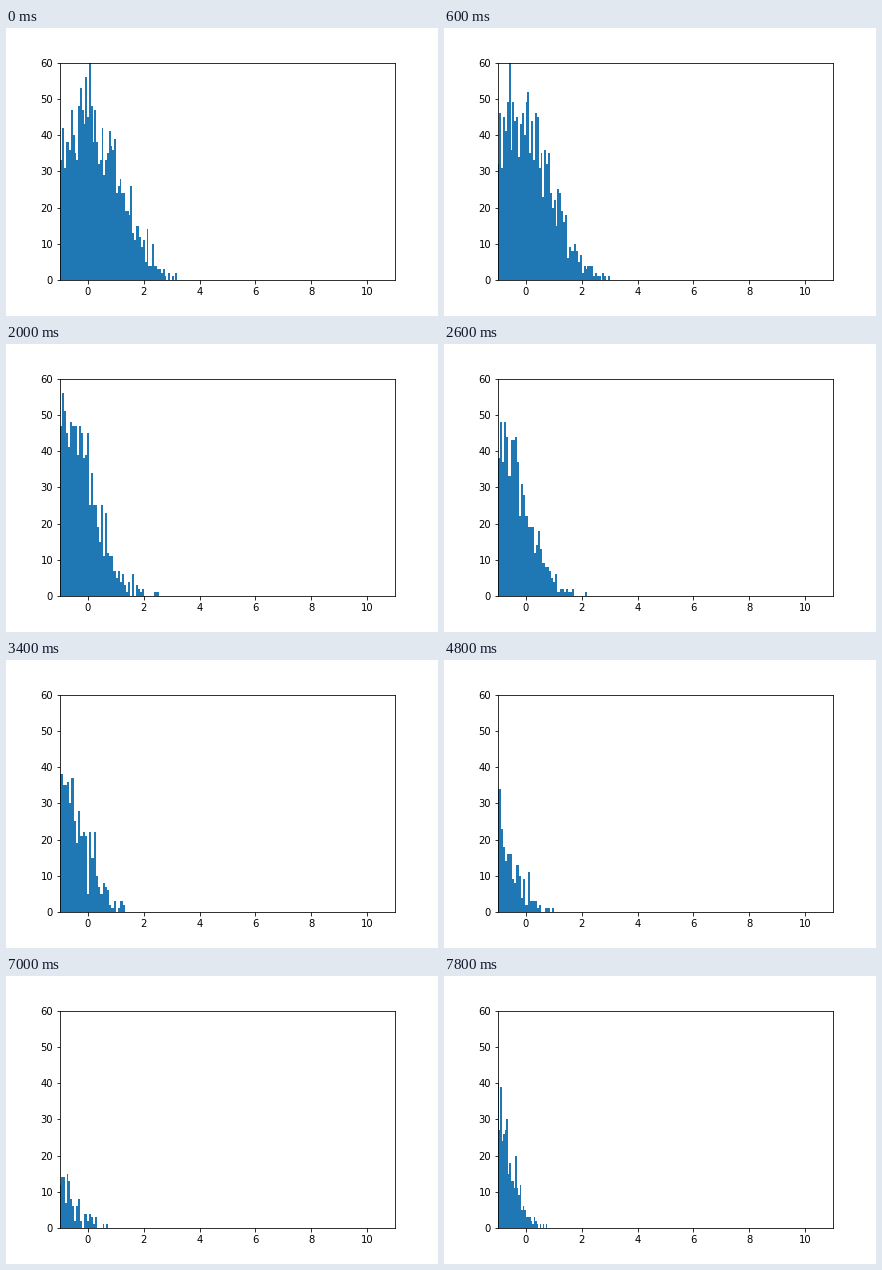
A matplotlib script for the animation above (8000 ms loop, 432 px wide and 288 px high).

```python
import numpy as np
import matplotlib.pyplot as plt
from matplotlib.animation import FuncAnimation

FRAMES, STEP = 40, 200
BARS = 80
PEAK = 47

# A bell curve drifts left, then returns a little and narrows
KNOTS = [0, 10, 20, 28, 35, 39]
MEAN = [0, -0.87, -1.74, -2.45, -2.4, -1.4]
SPREAD = [1.07, 1, 1, 1, 0.95, 0.65]
WIDTH = [0.0645, 0.0735, 0.0825, 0.078, 0.068, 0.054]


def histogram(i):
    """Left edge, bin width and random counts of the visible bins."""
    rng = np.random.default_rng(100 + i)
    mean, spread, width = (np.interp(i, KNOTS, v)
                           for v in (MEAN, SPREAD, WIDTH))
    left = -1 - rng.random() * width
    centres = left + (np.arange(BARS) + 0.5) * width
    expected = PEAK * np.exp(-((centres - mean) / spread) ** 2 / 2)
    return left, width, rng.poisson(expected)


fig = plt.figure(figsize=(6, 4), dpi=72)
fig.subplots_adjust(left=0.125, right=0.9, bottom=0.125, top=0.88)
ax = fig.add_subplot()
bars = ax.bar(np.arange(BARS), np.zeros(BARS), align="edge", color="#1f77b4")
ax.set(xlim=(-1, 11), ylim=(0, 60),
       xticks=range(0, 11, 2), yticks=range(0, 61, 10))


def draw(i):
    left, width, counts = histogram(i)
    for k, (bar, count) in enumerate(zip(bars, counts)):
        bar.set_x(left + k * width)
        bar.set_width(width)
        bar.set_height(count)
    return bars.patches


anim = FuncAnimation(fig, draw, frames=FRAMES, interval=STEP,
                     init_func=lambda: draw(0), repeat=True, repeat_delay=0)
plt.show()
```
